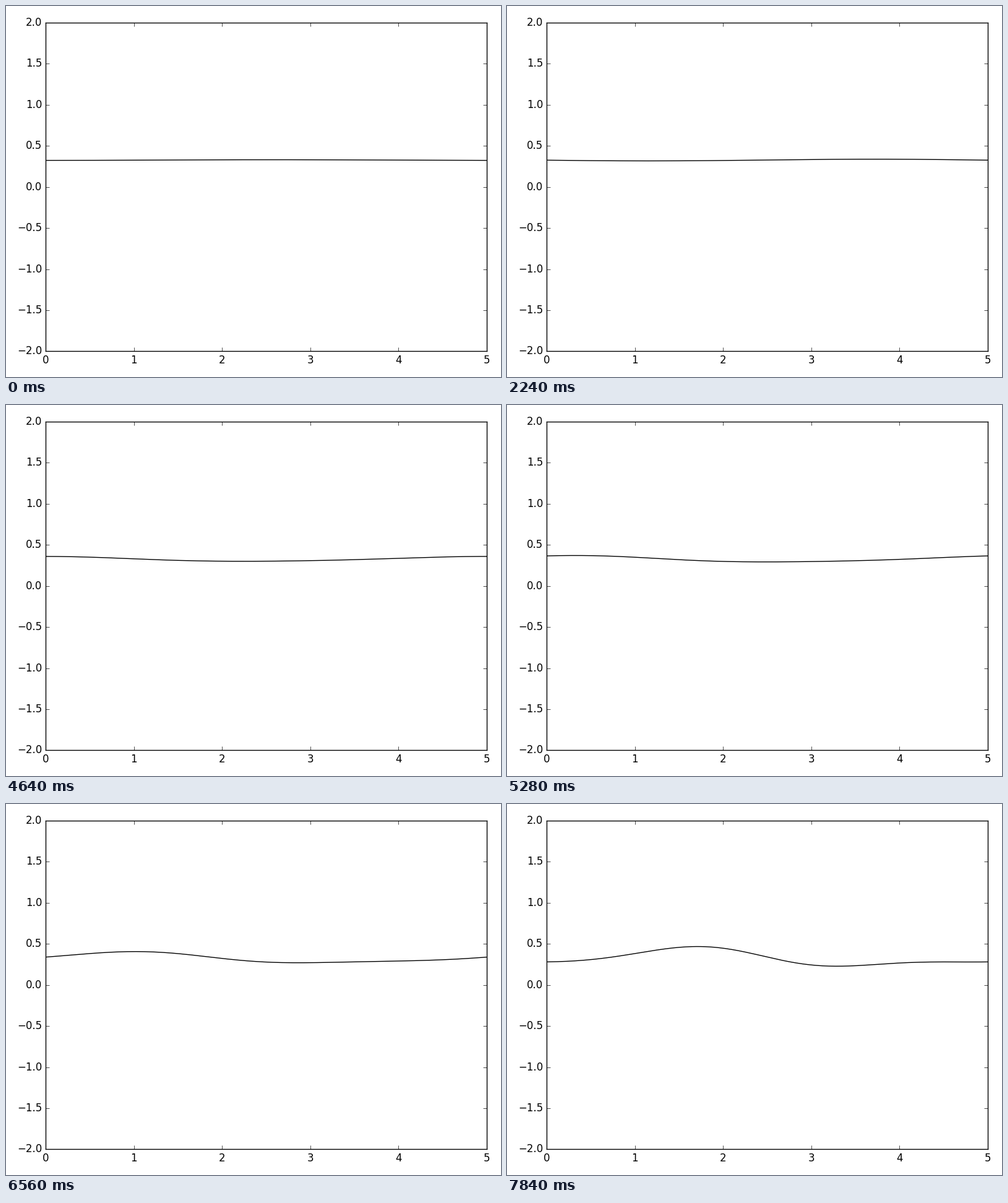
Animation, 800 px wide and 600 px high, one loop 8000 ms. Source, as a matplotlib script:

```python
import numpy as np
import matplotlib.pyplot as plt
from matplotlib.animation import FuncAnimation

W, H, DPI = 800, 600, 100
FRAMES, STEP = 50, 160          # 8000 ms loop
LENGTH = 5.0                    # periodic domain
SPEED, START = 0.505, 2.55      # crest speed per second, first crest position
GROWTH, SEED, LIMIT = 0.435, 64000.0, 37.0

plt.style.use("classic")
plt.rcParams.update({"font.family": "DejaVu Sans", "font.size": 12})

fig = plt.figure(figsize=(W / DPI, H / DPI), dpi=DPI, facecolor="white")
left, right, top, bottom = 64.06, 777.0, 27.0, 558.44   # plot box in pixels
ax = fig.add_axes([left / W, 1 - bottom / H, (right - left) / W, (bottom - top) / H])
ax.set_xlim(0, LENGTH)
ax.set_ylim(-2, 2)
ax.set_xticks(np.arange(0, 6))
ax.set_yticks(np.arange(-2, 2.1, 0.5))

x = np.linspace(0, LENGTH, 201)
line, = ax.plot(x, np.zeros_like(x), color="black", lw=1.0)


def wave(t):
    """Growing travelling wave that steepens as its harmonics catch up."""
    a = 1 / np.sqrt(SEED * np.exp(-2 * GROWTH * t) + LIMIT)
    amps = (a, (3.5 + 17 * a) * a**2, 5 * a**3)
    crest = START + SPEED * t
    k = 2 * np.pi / LENGTH
    y = np.full_like(x, 0.328 - 0.35 * a**2)
    for n, amp in enumerate(amps, 1):
        y += amp * np.cos(n * k * (x - crest - 0.25 * (n - 1)))
    return y


def update(i):
    line.set_ydata(wave(i * STEP / 1000))
    return line,


anim = FuncAnimation(fig, update, frames=FRAMES, interval=STEP,
                     repeat=True, repeat_delay=0, blit=False)
plt.show()
```
